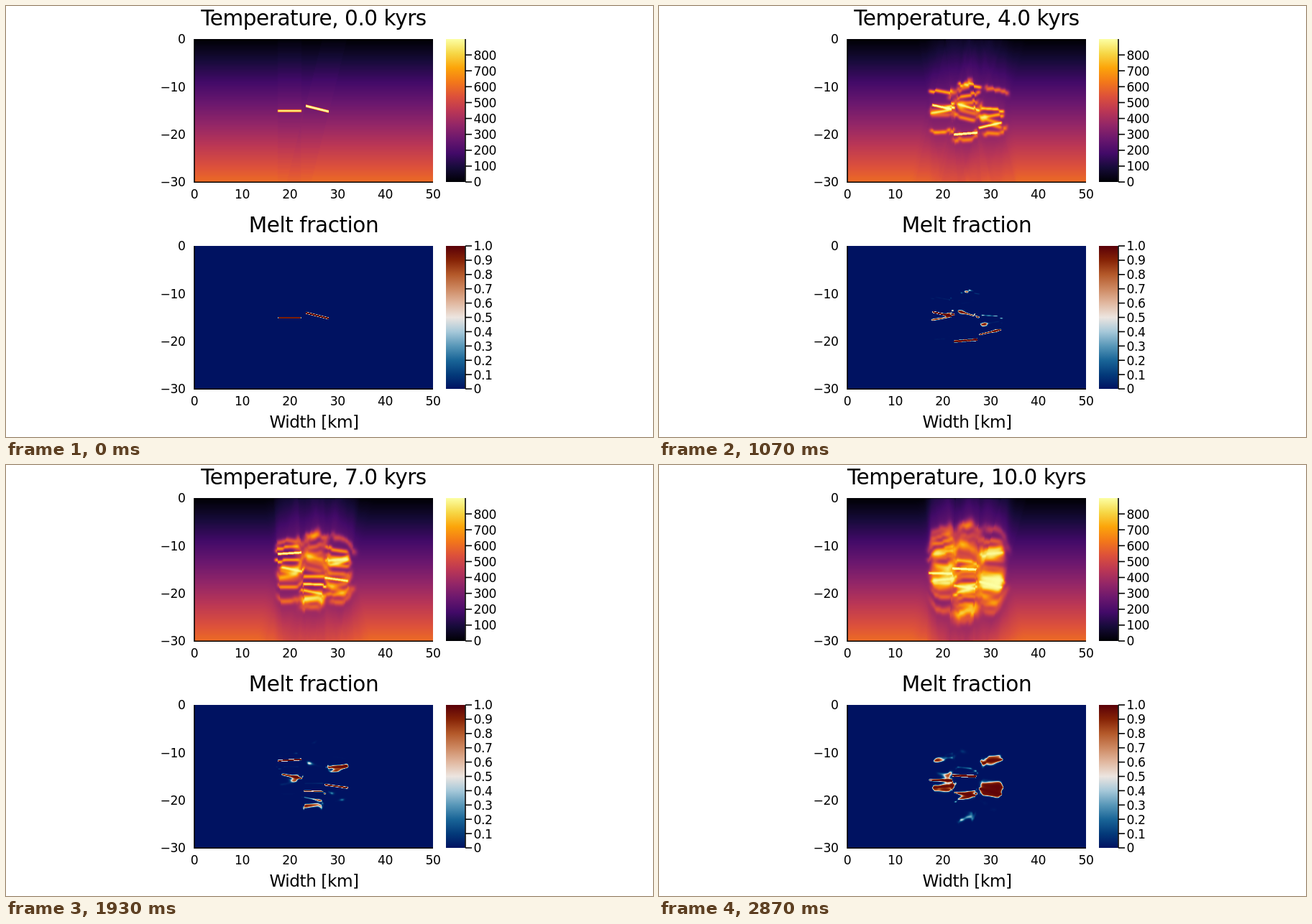
Write an HTML page with a canvas that moves like this. It is 900x600 px and loops after 2940 ms.

```html
<!DOCTYPE html>
<html lang="en">
<head>
<meta charset="utf-8">
<title>Dike intrusion</title>
<style>
  html, body { margin: 0; width: 100%; height: 100%; overflow: hidden; background: #fff; }
  canvas, svg { position: absolute; left: 0; top: 0; }
  canvas { left: 262px; }
  #heat { top: 46px; }
  #melt { top: 334px; }
  text { font: 17.2px "DejaVu Sans", sans-serif; letter-spacing: -0.025em; fill: #000; }
  .title { font-size: 29.5px; letter-spacing: -0.015em; text-anchor: middle; }
  .guide { font-size: 23.2px; letter-spacing: -0.02em; text-anchor: middle; }
</style>
</head>
<body>
<canvas id="heat" width="332" height="199"></canvas>
<canvas id="melt" width="332" height="199"></canvas>
<svg id="chart" width="900" height="600" viewBox="0 0 900 600"></svg>
<script>
const LOOP = 2940, FRAMES = 44;
const LEFT = 262, TOP = 46, WIDTH = 332, HEIGHT = 199, PANEL_GAP = 288;
const ROWS = HEIGHT * 2;               // two grid rows per pixel
const FRAME_KYR = 0.22458, SUBSTEPS = 4, DIKE_KYR = 0.2;
const DIFFUSIVITY = 0.8;               // px² per kyr
const DIKE_LENGTH = 33.2, DIKE_HALF_WIDTH = 1.7, PUSH = 2.8;
const DIKE_COUNT = 50;
const T_MAX = 900, T_BOTTOM = 600;

const INFERNO = ["#000004", "#160b39", "#420a68", "#6a176e", "#932667", "#bc3754",
  "#dd513a", "#f37819", "#fca50a", "#f6d746", "#fcffa4"];
const VIK = ["#001261", "#033a7a", "#196597", "#5897b8", "#a6c8d9", "#ece5e0",
  "#e1b8a0", "#cd8861", "#b4592a", "#862306", "#590008"];

// The opening sheets: centre x, centre y on the stage, dip in degrees.
const OPENING = [
  [394.5, 146, 0], [433, 143, 14], [419, 129, -16], [469, 128, -6],
  [427, 170, -4], [467, 166.5, 4], [427, 137.5, -1]
];

const clamp = (v, lo, hi) => Math.min(hi, Math.max(lo, v));
const meltFraction = t => 1 / (1 + Math.exp((800 - t) / 23));

// Seeded value between -1 and 1.
function noise(n) {
  const v = Math.sin(n * 12.9898) * 43758.5453;
  return 2 * (v - Math.floor(v)) - 1;
}

// Later sheets visit three neighbouring columns in turn, at scattered depths.
function dikeAt(n) {
  if (n < OPENING.length) return OPENING[n];
  const column = n % 3 - 1;
  const reach = column ? 24 : 32;
  return [428 + column * DIKE_LENGTH + 4 * noise(n), 146 + reach * noise(n + 100), 17 * noise(n + 200)];
}

/* ---------- heat model ---------- */

let field = new Float32Array(WIDTH * ROWS);
let next = new Float32Array(WIDTH * ROWS);
let clock = 0, injected = 0;
const history = [];

for (let j = 0; j < ROWS; j++) {
  field.fill(T_BOTTOM * j / (ROWS - 1), j * WIDTH, (j + 1) * WIDTH);
}

function sample(grid, x, y) {
  x = clamp(x, 0, WIDTH - 1.001);
  y = clamp(y, 0, ROWS - 1.001);
  const i = Math.floor(x), j = Math.floor(y), fx = x - i, fy = y - j;
  const k = j * WIDTH + i, m = k + WIDTH;
  return (grid[k] * (1 - fx) + grid[k + 1] * fx) * (1 - fy)
    + (grid[m] * (1 - fx) + grid[m + 1] * fx) * fy;
}

// Opens a hot sheet and shifts the rock on both sides away from it.
function inject([cx, cy, dip]) {
  const angle = dip * Math.PI / 180, cos = Math.cos(angle), sin = Math.sin(angle);
  const before = field.slice();
  for (let j = 0; j < ROWS; j++) {
    const y = (j + 0.5) / 2 - (cy - TOP);
    for (let i = 0; i < WIDTH; i++) {
      const x = i + 0.5 - (cx - LEFT);
      if (Math.abs(cos * x + sin * y) > DIKE_LENGTH / 2) continue;
      const across = cos * y - sin * x;
      const shift = clamp(across, -PUSH, PUSH);
      field[j * WIDTH + i] = Math.abs(across) < DIKE_HALF_WIDTH
        ? T_MAX
        : sample(before, i + sin * shift, j - 2 * cos * shift);
    }
  }
}

function diffuse(dt) {
  const rx = DIFFUSIVITY * dt, ry = rx * 4;
  next.set(field);
  for (let j = 1; j < ROWS - 1; j++) {
    for (let i = 1; i < WIDTH - 1; i++) {
      const k = j * WIDTH + i, t = field[k];
      next[k] = t + rx * (field[k - 1] + field[k + 1] - 2 * t)
        + ry * (field[k - WIDTH] + field[k + WIDTH] - 2 * t);
    }
  }
  next.fill(0, 0, WIDTH);
  next.fill(T_BOTTOM, (ROWS - 1) * WIDTH);
  [field, next] = [next, field];
}

function advance() {
  const dt = FRAME_KYR / SUBSTEPS;
  for (let s = 0; s < SUBSTEPS; s++) {
    clock += dt;
    while (injected < DIKE_COUNT && injected * DIKE_KYR <= clock) inject(dikeAt(injected++));
    diffuse(dt);
  }
  history.push(field.slice());
}

function fieldAt(frame) {
  while (history.length <= frame) advance();
  return history[frame];
}

/* ---------- fixed chart parts ---------- */

const svg = document.getElementById("chart");

function add(tag, attributes, content = "") {
  const node = document.createElementNS("http://www.w3.org/2000/svg", tag);
  for (const name in attributes) node.setAttribute(name, attributes[name]);
  node.textContent = content;
  svg.appendChild(node);
  return node;
}

const label = (x, y, content, anchor) => add("text", { x, y, "text-anchor": anchor }, content);
const line = d => add("path", { d, fill: "none", stroke: "#000", "stroke-width": 1.6 });

function drawPanel(top, id, colours, maximum, ticks) {
  const bottom = top + HEIGHT;
  line(`M${LEFT} ${top}V${bottom + 0.2}H${LEFT + WIDTH}`);
  for (let km = 0; km <= 50; km += 10) {
    label(LEFT + km * WIDTH / 50, bottom + 23.2, km, "middle");
  }
  for (let km = 0; km <= 30; km += 10) {
    label(249.6, top + km * HEIGHT / 30 + 6.4, km ? "\u2212" + km : "0", "end");
  }

  const gradient = add("linearGradient", { id, x1: 0, y1: 1, x2: 0, y2: 0 });
  colours.forEach((colour, n) => gradient.appendChild(
    add("stop", { offset: n / (colours.length - 1), "stop-color": colour })));
  add("rect", { x: 612, y: top, width: 26.5, height: HEIGHT, fill: `url(#${id})` });
  line(`M639 ${top}V${bottom}`);
  for (const tick of ticks) {
    const y = bottom - HEIGHT * tick / maximum;
    line(`M639 ${y}H648`);
    label(650.5, y + 6.4, tick && maximum === 1 ? tick.toFixed(1) : tick, "start");
  }
}

const steps = (count, size) => Array.from({ length: count }, (_, n) => n * size);
drawPanel(TOP, "inferno", INFERNO, T_MAX, steps(9, 100));
drawPanel(TOP + PANEL_GAP, "vik", VIK, 1, steps(11, 0.1));
const title = add("text", { class: "title", x: 428, y: 26.8 });
add("text", { class: "title", x: 428, y: 314.8 }, "Melt fraction");
add("text", { class: "guide", x: 428.5, y: 587.3 }, "Width [km]");

/* ---------- heat maps ---------- */

function palette(colours) {
  const rgb = colours.map(c => [1, 3, 5].map(p => parseInt(c.slice(p, p + 2), 16)));
  return Array.from({ length: 256 }, (_, n) => {
    const place = n / 255 * (rgb.length - 1);
    const k = Math.min(rgb.length - 2, Math.floor(place));
    return rgb[k].map((v, c) => v + (rgb[k + 1][c] - v) * (place - k));
  });
}

function createMap(id, colours, level) {
  const context = document.getElementById(id).getContext("2d");
  const image = context.createImageData(WIDTH, HEIGHT);
  const lookup = palette(colours);
  return grid => {
    for (let p = 0; p < WIDTH * HEIGHT; p++) {
      const k = Math.floor(p / WIDTH) * 2 * WIDTH + p % WIDTH;
      const value = (level(grid[k]) + level(grid[k + WIDTH])) / 2;
      const colour = lookup[Math.round(clamp(value, 0, 1) * 255)];
      image.data.set(colour, p * 4);
      image.data[p * 4 + 3] = 255;
    }
    context.putImageData(image, 0, 0);
  };
}

const drawHeat = createMap("heat", INFERNO, t => t / T_MAX);
const drawMelt = createMap("melt", VIK, meltFraction);

/* ---------- playback ---------- */

const start = performance.now();
let shown = -1;

function render(time) {
  const ticks = Math.floor(time % LOOP / 10);
  const frame = Math.min(FRAMES - 1, Math.floor((ticks + 0.5) * 0.15));
  if (frame === shown) return;
  shown = frame;
  const grid = fieldAt(frame);
  drawHeat(grid);
  drawMelt(grid);
  title.textContent = `Temperature, ${Math.round((frame + 1) * FRAME_KYR)}.0 kyrs`;
}

function loop() {
  render(performance.now() - start);
  requestAnimationFrame(loop);
}
loop();
</script>
</body>
</html>
```
